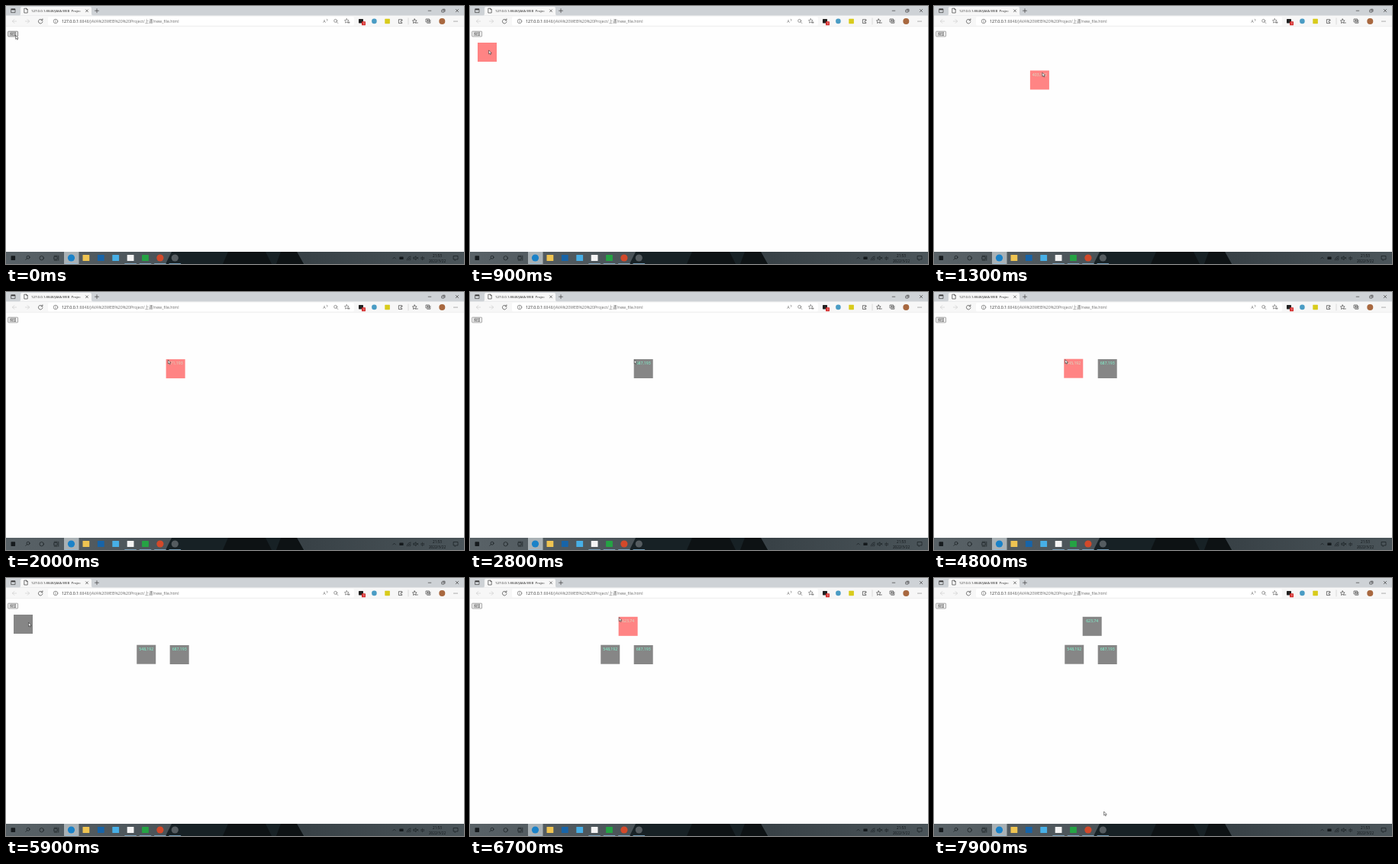
Recreate the animation shown at these times as an HTML page. Size 600 by 338 pixels, loop 8000 ms.

```html
<!DOCTYPE html>
<html lang="zh">
<head>
<meta charset="utf-8">
<title>Drag boxes</title>
<style>
html, body { margin: 0; width: 100%; height: 100%; overflow: hidden; background: #fefefe; }
svg { display: block; width: 100vw; height: 100vh; }
text { font-family: "Open Sans", "Noto Sans CJK SC", "Noto Sans CJK", sans-serif; }
.line { fill: none; stroke: #333; stroke-width: .65; stroke-linecap: round; stroke-linejoin: round; }
.pale { stroke: #cbcbcb; }
.soft { stroke: #666; }
.tray { stroke: #14191c; }
.mid { text-anchor: middle; }
</style>
</head>
<body>
<svg viewBox="0 0 600 338" preserveAspectRatio="none">
  <defs>
    <linearGradient id="bar">
      <stop offset="0" stop-color="#596267"/>
      <stop offset=".35" stop-color="#4a5358"/>
      <stop offset=".65" stop-color="#384146"/>
      <stop offset="1" stop-color="#4b555a"/>
    </linearGradient>
    <linearGradient id="fade">
      <stop offset="0" stop-color="#f7f7f7" stop-opacity="0"/>
      <stop offset="1" stop-color="#f7f7f7"/>
    </linearGradient>
  </defs>
  <rect width="600" height="338" fill="#fefefe"/>

  <!-- browser frame -->
  <rect width="600" height="13" fill="#ced2d6"/>
  <path d="M17 12.5Q19 12.5 19 10V3Q19 1 21 1H110Q112 1 112 3V10Q112 12.5 114 12.5Z" fill="#f7f7f7"/>
  <text x="33" y="7.8" font-size="4.35" fill="#222" xml:space="preserve">127.0.0.1:8848/JAVA WEB  Projec</text>
  <rect x="95" y="3" width="6" height="8" fill="url(#fade)"/>
  <rect y="12.5" width="600" height="14.5" fill="#f7f7f7"/>
  <rect y="26.7" width="600" height=".4" fill="#e2e2e2"/>
  <rect x="55" y="14" width="401" height="11.6" rx="2" fill="#fff"/>
  <text x="415.5" y="21.8" font-size="5" fill="#666">A</text>
  <text x="73" y="21.9" font-size="5.22" fill="#6c6c6c"><tspan fill="#222">127.0.0.1</tspan>:8848/JAVA%20WEB%20%20Project/上课/new_file.html</text>

  <!-- taskbar -->
  <rect y="322" width="600" height="16" fill="url(#bar)"/>
  <path d="M217 322H381L390 338H209Z" fill="#172125"/>
  <path d="M291 322H340L348 338H284ZM360 322H381L390 338H354Z" fill="#0d1214"/>
  <rect x="76" y="322" width="19.5" height="16" fill="#a9b1b5"/>
  <g id="icons"></g>
  <g class="mid" fill="#101518">
    <text x="468.5" y="24.3" font-size="3.8" fill="#fff">3</text>
    <text x="545.7" y="332" font-size="5">中</text>
    <text x="565" y="328.6" font-size="4.7">21:53</text>
    <text x="565" y="335.8" font-size="4.7">2022/3/22</text>
  </g>

  <!-- page -->
  <rect id="button" x="2.6" y="33.2" width="13" height="6.8" rx=".8" stroke-width=".6"/>
  <text class="mid" x="9.1" y="38.2" font-size="4.2" fill="#333">按钮</text>
  <g id="boxes"></g>
  <path id="cursor" d="M0 0V5L1.2 4L2 5.8L2.9 5.4L2.1 3.7H3.6Z" fill="#fff" stroke="#111" stroke-width=".5"/>
</svg>
<script>
const LOOP = 8000, STEP = 100, LAG = 70;
const UNIT = .3125, PAGE_TOP = 88.6, SIZE = 25;
const DRAG_SHARE = .815; // part of the hold spent moving
const HOME = { x: 10, y: 48 }, REST = { x: 12, y: 37.5 }, EXIT = { x: 222, y: 305 };

const toStage = (x, y) => ({ x: x * UNIT, y: (y + PAGE_TOP) * UNIT });

const ROUNDS = [
  { born: 100, reach: 700, press: 900, release: 2700, back: 3500,
    grab: { x: 24, y: 57 }, drop: toStage(687, 193), next: REST },
  { born: 3600, reach: 4100, press: 4200, release: 5000, back: 5500,
    grab: { x: 23, y: 54 }, drop: toStage(548, 192), next: REST },
  { born: 5600, reach: 5900, press: 6100, release: 6800, back: 7900,
    grab: { x: 29, y: 57.5 }, drop: toStage(623, 74), next: EXIT }
];

const get = id => document.getElementById(id);
const set = (el, attrs) => {
  for (const key in attrs) el.setAttribute(key, attrs[key]);
  return el;
};
const add = (parent, name, attrs = {}) =>
  set(parent.appendChild(document.createElementNS("http://www.w3.org/2000/svg", name)), attrs);

// fixed icons
const icons = get("icons");
const line = (d, tone = "") => add(icons, "path", { d, class: "line " + tone });
const ring = (cx, cy, r, tone = "") => add(icons, "circle", { cx, cy, r, class: "line " + tone });
const disc = (cx, cy, r, fill) => add(icons, "circle", { cx, cy, r, fill });
const frame = (x, y, w, h, tone = "") => line(`M${x} ${y}h${w}v${h}h${-w}z`, tone);
const block = (cx, cy, w, h, fill) =>
  add(icons, "rect", { x: cx - w / 2, y: cy - h / 2, width: w, height: h, rx: .6, fill });
const cross = (x, y, r, tone) =>
  line(`M${x - r} ${y - r}l${2 * r} ${2 * r}m0 ${-2 * r}l${-2 * r} ${2 * r}`, tone);
const plus = (x, y, r, tone) => line(`M${x - r} ${y}h${2 * r}m${-r} ${-r}v${2 * r}`, tone);
const arrow = (x, dir) => line(`M${x - 2.6 * dir} 20h${5.2 * dir}m${-2.4 * dir} -2.4l${2.4 * dir} 2.4l${-2.4 * dir} 2.4`, "pale");
const lens = (x, y, side, tone) => {
  ring(x, y, 2, tone);
  line(`M${x + 1.4 * side} ${y + 1.4}l${1.8 * side} 1.8`, tone);
};
const star = (x, y, tone) => {
  const points = Array.from({ length: 10 }, (_, i) => {
    const r = i % 2 ? 1.5 : 3, a = i * Math.PI / 5;
    return `${x + r * Math.sin(a)} ${y - r * Math.cos(a)}`;
  });
  line(`M${points.join("L")}Z`, tone);
};

function drawIcons() {
  frame(7, 3.8, 5, 4.8);
  block(9.5, 4.4, 5, 1.5, "#333");
  line("M24.2 3.2h2.6l1.4 1.4V9h-4zm2.6 0v1.4h1.4");
  cross(106, 6.3, 1.5);
  plus(119, 6.2, 2.5);
  line("M553.2 6.2h3.6");
  frame(571.2, 5.2, 2.8, 2.8);
  line("M572.2 4.2H575V7");
  cross(591, 6.1, 1.7);

  arrow(11, -1);
  arrow(28, 1);
  line("M47.5 18.5A2.8 2.8 0 1 0 48 20.6M47.9 16.8v2h-2");
  ring(65, 20, 2.8, "soft");
  line("M65 19.8v1.6m0 -2.9v.1", "soft");
  line("M420.5 17.2q1 1 .3 2.1", "soft");
  lens(431.7, 19.4, 1, "soft");
  star(446.3, 19.7, "soft");
  plus(449.2, 21.6, 1, "soft");
  block(465, 19.7, 6, 5.5, "#222");
  block(468.5, 22.8, 5, 5, "#d42a2a");
  disc(482.4, 19.9, 3.3, "#4a9cc4");
  block(499.6, 20, 6.6, 6.4, "#d8cb1c");
  line("M518.8 18.9V17.7h-4.4v4.8h4.4V21.5q-2 -.2 -2 -1.3t2 -1.3z");
  line("M527 16v8", "pale");
  star(535.3, 20);
  line("M537.8 22h1.6");
  frame(550.5, 17, 4, 4);
  line("M555.8 18.3v4h-4");
  plus(552.5, 19, 1);
  disc(571.3, 20, 4, "#a8683f");
  for (const x of [587, 589, 591]) disc(x, 20, .5, "#333");

  block(9.3, 330.1, 5.6, 5.6, "#161b1e");
  lens(29, 329.2, -1, "tray");
  ring(46.7, 330.2, 2.7, "tray");
  frame(63.2, 328.6, 4, 3.2, "tray");
  line("M63.2 327.2h4m-4 6h4m1.6 -6v6", "tray");
  const apps = ["#1a82c8", "#efc452", "#1764a8", "#47afe6", "#f4f4f4", "#25a344", "#d2492a", "#555c60"];
  apps.forEach((fill, i) => {
    const x = 85.5 + 19.4 * i, round = i === 0 || i > 5;
    if (round) disc(x, 330, 4.6, fill);
    else block(x, 330, 8.8, 8, fill);
    if (i === 0 || i > 3) block(x, 337.6, 16, .8, "#8fc0e2");
  });
  line("M506.8 331l1.8 -1.8l1.8 1.8", "tray");
  block(518, 330.3, 5.2, 3.4, "#14191c");
  for (const r of [1.2, 3, 4.8]) line(`M${530.2 - r} 332.8a${r} ${r} 0 0 1 ${r} ${-r}`, "tray");
  line("M534.2 329.2h1.2l1.6 -1.5v5l-1.6 -1.5h-1.2z", "tray");
  cross(539, 330.2, 1, "tray");
  line("M586.5 327.5h5.5v4.5h-2.5l-1.3 1.4v-1.4h-1.7z", "tray");
}

// motion
const easeOut = k => 1 - (1 - k) ** 3;
const smooth = k => k * k * (3 - 2 * k);

function glide(a, b, t, start, end, ease, sag = 0) {
  const e = ease(Math.min(1, Math.max(0, (t - start) / (end - start))));
  return {
    x: a.x + (b.x - a.x) * e,
    y: a.y + (b.y - a.y) * e + sag * Math.sin(Math.PI * e)
  };
}

function pointer(t) {
  const r = ROUNDS.findLast(round => t >= round.born) || ROUNDS[0];
  if (t < r.press) return glide(REST, r.grab, t, r.born + STEP, r.reach, smooth);
  if (t <= r.release + STEP) {
    const stop = r.press + (r.release - r.press) * DRAG_SHARE;
    return glide(r.grab, r.drop, t, r.press, stop, easeOut, 11);
  }
  return glide(r.drop, r.next, t, r.release + STEP, r.back, smooth);
}

const boxes = ROUNDS.map(round => {
  const group = add(get("boxes"), "g");
  const rect = add(group, "rect", { width: SIZE, height: SIZE });
  const label = add(group, "text", { class: "mid", x: SIZE / 2, y: 7.2, "font-size": 5.2 });
  return { ...round, group, rect, label };
});

const move = (el, x, y) => set(el, { transform: `translate(${x} ${y})` });

function drawBox({ born, press, release, group, rect, label }, t) {
  const held = t >= press && t < release;
  const moved = t > press + LAG;
  // a dragged box trails the pointer slightly
  const p = moved ? pointer(Math.min(t - LAG, release)) : HOME;
  set(group, { visibility: t >= born ? "visible" : "hidden" });
  move(group, p.x, p.y);
  set(rect, { fill: held ? "#ff8484" : "#868686" });
  set(label, { fill: held ? "#d3e2c8" : "#7fffd4" });
  label.textContent = moved
    ? `${Math.round(p.x / UNIT)},${Math.round(p.y / UNIT - PAGE_TOP)}` : "";
}

function draw(time) {
  const t = Math.floor((time % LOOP) / STEP) * STEP;
  const p = pointer(t);
  const hover = p.x > 2 && p.x < 16 && p.y > 33 && p.y < 40;
  set(get("button"), { fill: hover ? "#e0e0e0" : "#efefef", stroke: hover ? "#4f4f4f" : "#767676" });
  boxes.forEach(box => drawBox(box, t));
  move(get("cursor"), p.x + .6, p.y + .9);
}

drawIcons();
const start = performance.now();
function tick() {
  draw(performance.now() - start);
  requestAnimationFrame(tick);
}
tick();
</script>
</body>
</html>
```
